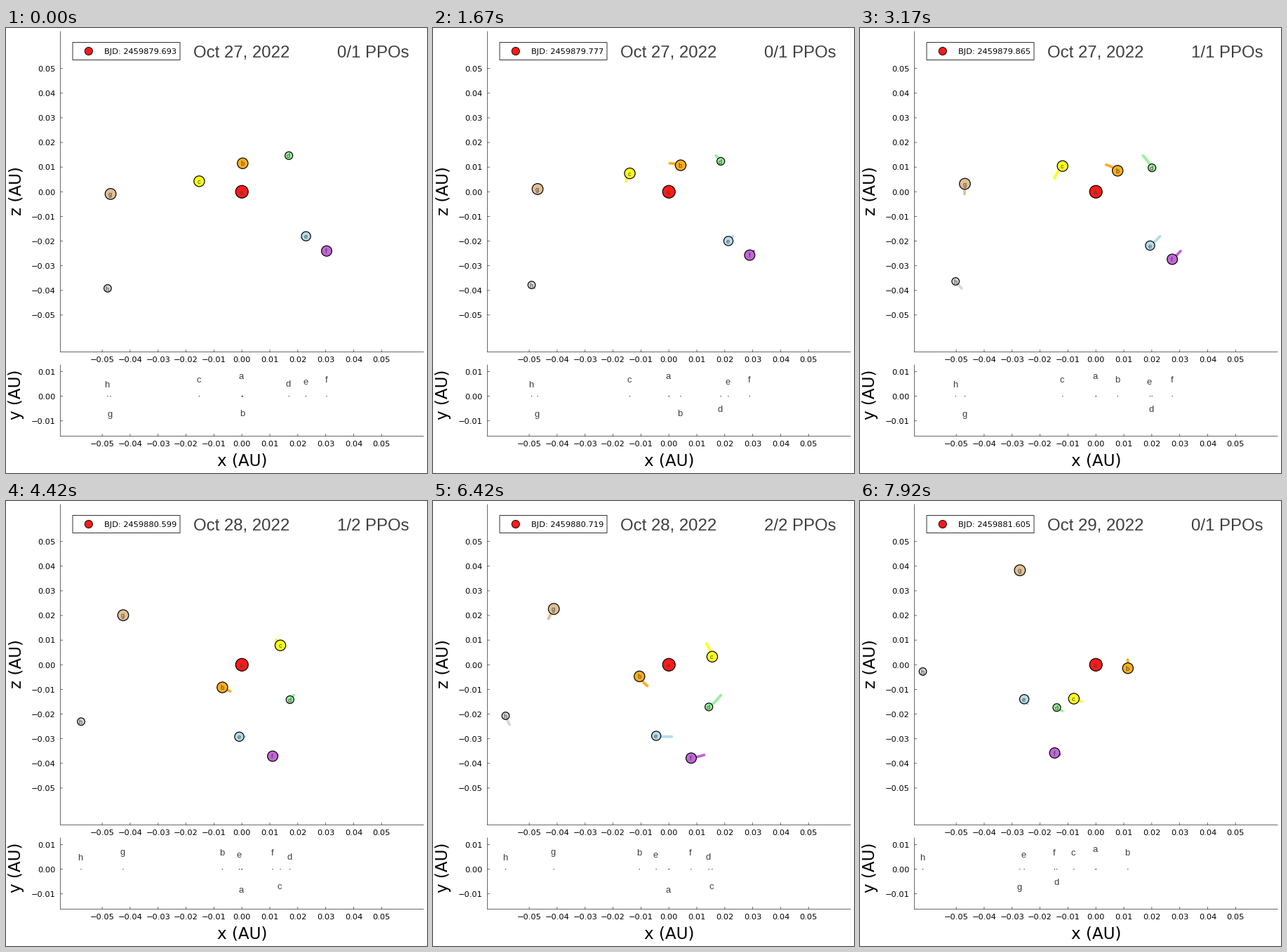
Recreate the animation shown at these times as a matplotlib script. Size 600 px wide and 634 px high, loop 8 s.

```python
import numpy as np
import matplotlib.pyplot as plt
from matplotlib.animation import FuncAnimation
from matplotlib.colors import to_rgb
from matplotlib.patches import Circle, Rectangle

W, H, DPI = 600, 634, 100
PT = 72 / DPI                      # points per pixel
X0, Z0, Y0 = 336.2, 233.3, 524.6   # pixel position of the axes' zeros
SX, SZ = 3982, 3512                # pixels per AU
GRAY, AXIS = "#3f3f3f", "#444444"
TICKS, FPS, HELD = 96, 12, 6       # every sixth tick repeats the picture before it

# name: colour, disc radius, orbit (AU), period (days), phase (deg), trail (days)
BODIES = {
    "a": ("red", 9.0, 0, 1, 0, 0),
    "b": ("orange", 7.6, 0.01154, 1.510826, 88.6, 0.1),
    "c": ("yellow", 7.6, 0.01585, 2.421937, 164.4, 0.14),
    "d": ("lightgreen", 5.5, 0.0223, 4.049219, 41.1, 1),
    "e": ("lightblue", 6.6, 0.0292, 6.08, -38.2, 1),
    "f": ("mediumorchid", 7.4, 0.0387, 9.3, -38.4, 1),
    "g": ("burlywood", 7.8, 0.0470, 12.352446, 181.1, 1),
    "h": ("lightgray", 5.3, 0.0620, 18.772866, 219.2, 1),
}

# one entry per night: first step, step of each event, total, date, steps, days
START = 0.693
NIGHTS = [
    (0, [27], 1, "Oct 27, 2022", [0, 3, 17, 32], [0.693, 0.693, 0.777, 0.865]),
    (33, [0, 57], 2, "Oct 28, 2022", [33, 44, 53, 64, 66],
     [1.533, 1.599, 1.655, 1.719, 1.731]),
    (67, [], 1, "Oct 29, 2022", [67, 79], [2.533, 2.605]),
]

fig = plt.figure(figsize=(W / DPI, H / DPI), dpi=DPI, facecolor="white")
ax = fig.add_axes([0, 0, 1, 1])
ax.set_xlim(0, W)
ax.set_ylim(H, 0)
ax.axis("off")


def text(x, y, s, size, font="DejaVu Sans", color="black", **kw):
    kw.setdefault("ha", "center")
    return ax.text(x, y, s, fontsize=size * PT, family=font, color=color,
                   va="baseline", **kw)


def line(xs, ys, width=0.8, color=AXIS, **kw):
    return ax.plot(xs, ys, color=color, lw=width * PT, snap=False, **kw)[0]


def disc(x, y, r, color, edge=1.2, z=3):
    c = Circle((x, y), r, facecolor=color, edgecolor="black", lw=edge * PT, zorder=z)
    return ax.add_patch(c)


def label(v):
    return f"{v / 100:.2f}".replace("-", "\u2212")


def panel(top, bottom, mid, reach):
    line([77.5, 77.5], [top, bottom])
    line([77.5, 595], [bottom, bottom])
    for v in range(-5, 6):
        x = X0 + v * SX / 100
        line([x, x], [bottom, bottom - 3])
        text(x, bottom + 15, label(v), 11.4)
    for v in range(-reach, reach + 1):
        y = mid - v * SZ / 100
        line([77.5, 80.5], [y, y])
        text(70.5, y + 4.2, label(v), 11.4, ha="right")


def soften(color):
    return 0.9 * np.array(to_rgb(color)) + 0.1


panel(5, 461.5, Z0, 5)
panel(480, 581.5, Y0, 1)
text(336.5, 623, "x (AU)", 23)
for y, name in ((232.3, "z (AU)"), (522.8, "y (AU)")):
    text(21.5, y, name, 23, rotation=90, rotation_mode="anchor")

ax.add_patch(Rectangle((95, 20.5), 153, 25, facecolor="white",
                       edgecolor="black", lw=0.8 * PT, snap=False))
disc(117.8, 33, 5.6, soften("red"), 0.9)
clock = text(140.2, 37, "", 11.4, ha="left")
date = text(335.2, 42, "", 24, "Liberation Sans", GRAY)
count = text(523.4, 42, "", 24, "Liberation Sans", GRAY)

discs, trails, names, tags, dots = {}, {}, {}, {}, {}
for k, (color, r, *_) in BODIES.items():
    trails[k] = line([], [], 3.8, soften(color), solid_capstyle="round", zorder=2)
    discs[k] = disc(X0, Z0, r, soften(color))
    names[k] = text(X0, Z0, k, 9.2, "Liberation Sans", GRAY, zorder=4)
    tags[k] = text(X0, Y0, k, 13, "Liberation Sans", GRAY)
    dots[k] = ax.add_patch(Circle((X0, Y0), 0.75 if k == "a" else 0.6, color="black", lw=0))


def place(k, day):
    _, _, a, period, phase, _ = BODIES[k]
    ang = np.radians(phase - 360 * (day - START) / period)
    return X0 + SX * a * np.cos(ang), Z0 - SZ * a * np.sin(ang)


def update(tick):
    n = tick - (tick + 3) // HELD
    night = [g for g in NIGHTS if g[0] <= n][-1]
    _, events, total, day_name, steps, days = night
    day = np.interp(n, steps, days)

    clock.set_text(f"BJD: {2459879 + day:.3f}")
    date.set_text(day_name)
    count.set_text(f"{sum(n >= e for e in events)}/{total} PPOs")

    spots = {k: place(k, day) for k in BODIES}
    for k, (x, z) in spots.items():
        discs[k].center = (x, z)
        dots[k].center = (x, Y0)
        names[k].set_position((x - 0.6, z + 3.6))
        begin = max(days[0], day - BODIES[k][5])
        if k != "a" and day > begin:
            trails[k].set_data(*place(k, np.linspace(begin, day, 20)))
        else:
            trails[k].set_data([], [])

    # nearest bodies take the upper row, crowded ones drop below
    upper = []
    for k in sorted(spots, key=lambda k: -spots[k][1]):
        x = spots[k][0]
        side = 1 if any(abs(x - u) < 22 for u in upper) else -1
        if side < 0:
            upper.append(x)
        tags[k].set_position((x - 0.8, Y0 + side * 3.2 * BODIES[k][1] + 4.4))
    return []


anim = FuncAnimation(fig, update, frames=TICKS, interval=1000 / FPS,
                     init_func=lambda: update(0), repeat=True, repeat_delay=0, blit=False)
plt.show()
```
